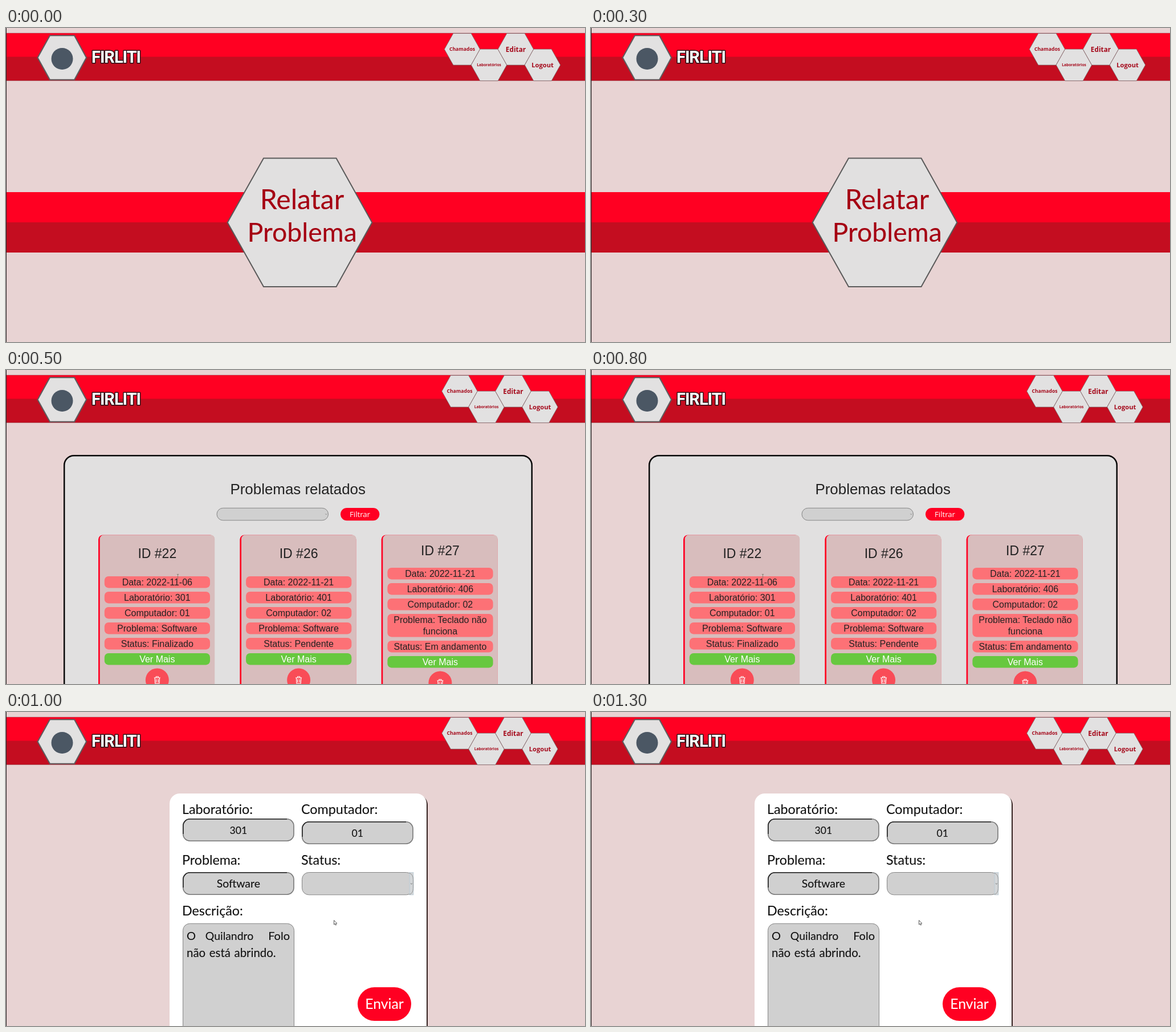
An HTML page for the animation above (1.5 s loop, 1016 px wide and 551 px high).

```html
<!DOCTYPE html>
<html lang="pt">
<head>
<meta charset="utf-8">
<title>Chamados</title>
<style>
  html, body { margin: 0; width: 100%; height: 100%; overflow: hidden; background: #e8d3d3; }
  svg { display: block; width: 1016px; height: 551px; }
  text { white-space: pre; }
  .nav { font-family: "Open Sans", "Noto Sans", sans-serif; font-weight: 700; fill: #a5091b; }
  .soft { font-family: Lato, "Open Sans", sans-serif; stroke-width: .1px; }
  .plain { font-family: "Liberation Sans", Arial, sans-serif; fill: #222; }
  .brand { font: 700 29px Roboto, sans-serif; letter-spacing: -1px; fill: #fff;
           stroke: #2b1015; stroke-width: 3px; stroke-linejoin: round; paint-order: stroke; }
  .scene { visibility: hidden; animation: 1.5s step-end infinite; }
  #home { animation-name: first; }
  #list { animation-name: second; }
  #form { animation-name: third; }
  #nav { animation: shift 1.5s step-end infinite; }
  @keyframes first { 0% { visibility: visible } 33.3333%, 100% { visibility: hidden } }
  @keyframes second { 0% { visibility: hidden } 33.3333% { visibility: visible } 66.6667%, 100% { visibility: hidden } }
  @keyframes third { 0% { visibility: hidden } 66.6667%, 100% { visibility: visible } }
  @keyframes shift { 0% { transform: none } 33.3333%, 100% { transform: translateX(-4.5px) } }
</style>
</head>
<body>
<svg viewBox="0 0 1016 551">
  <rect width="1016" height="551" fill="#e8d3d3"/>
  <rect y="9" width="1016" height="42" fill="#ff0022"/>
  <rect y="50.5" width="1016" height="42" fill="#c40d20"/>
  <path d="M0 9H1016M0 92.5H1016" stroke="#8a4a50" stroke-width=".5"/>
  <path d="M55.5 52L77 13.3H120L141 52L120 90.7H77Z" fill="#e2e1e1" stroke="#5f5c5e" stroke-width="2"/>
  <circle cx="98.5" cy="54" r="19" fill="#4b5764"/>
  <text class="brand" x="150" y="61">FIRLITI</text>
  <g id="nav"></g>
  <g id="home" class="scene"></g>
  <g id="list" class="scene"></g>
  <g id="form" class="scene"></g>
  <rect width="1" height="551" fill="#2a2224"/>
</svg>
<script>
  const RED = '#ff0022', GREY = '#d0d0d0';

  const box = (x, y, w, h, r, fill, extra = '') =>
    `<rect x="${x}" y="${y}" width="${w}" height="${h}" rx="${r}" fill="${fill}" ${extra}/>`;

  const label = (cls, text, x, y, size, extra = 'text-anchor="middle"') =>
    `<text class="${cls}" x="${x}" y="${y}" font-size="${size}" ${extra}>${text}</text>`;

  const soft = (text, x, y, size, color, anchor = 'middle', extra = '') =>
    label('soft', text, x, y, size, `fill="${color}" stroke="${color}" text-anchor="${anchor}" ${extra}`);

  const show = (id, ...parts) => document.getElementById(id).innerHTML = parts.flat().join('');

  // Header menu
  const tab = (text, cx, cy, size, base) =>
    `<path d="M${cx - 31.3} ${cy}l15.6 -27.8h31.4l15.6 27.8l-15.6 27.8h-31.4Z" fill="#e2e1e1" stroke="#77595c" stroke-width=".8"/>` +
    label('nav', text, cx, base, size);

  show('nav',
    tab('Chamados', 800.5, 37.3, 8.6, 40.3),
    tab('Laboratórios', 847.5, 64.9, 6.7, 67.2),
    tab('Editar', 894.5, 37.3, 11.8, 42),
    tab('Logout', 941.5, 64.9, 11.2, 69));

  // Home
  show('home',
    box(0, 288, 1016, 53, 0, RED),
    box(0, 341, 1016, 53, 0, '#c40d20'),
    '<path d="M388.7 341.3L452 228.5H579.5L642.3 341.3L579.5 454H452Z" fill="#e1e0e0" stroke="#5a5a5a" stroke-width="2"/>',
    soft('Relatar', 519.5, 318, 48, '#a50012'),
    soft('Problema', 519.7, 375, 46.4, '#a50012'));

  // Ticket list
  const trash = (x, y) =>
    `<circle cx="${x}" cy="${y}" r="20.5" fill="#f94c57"/>
     <path d="M${x - 5.5} ${y - 4}h11M${x - 2} ${y - 4}v-2h4v2M${x - 4.2} ${y - 3.5}l.6 9.5h7.2l.6 -9.5M${x - 1.7} ${y - 1.5}v5.5M${x + 1.7} ${y - 1.5}v5.5"
       fill="none" stroke="#fff" stroke-width="1.2"/>`;

  function card(x, top, id, rows) {
    const mid = x + 103.3;
    let y = top;
    let out = box(x, 289.5, 204, 300, 8, RED) + box(x + 2.7, 289.5, 201.5, 300, 7, '#d8bdbd') +
      label('plain', `ID #${id}`, mid, 330 + (top - 362) / 3, 23);
    for (const row of [...rows, 'Ver Mais']) {
      const lines = row.split('|'), last = row === 'Ver Mais', h = lines.length * 20;
      out += box(x + 10.8, y, 185.2, h + .4, 7, last ? '#67c83f' : '#fd7176');
      lines.forEach((line, i) =>
        out += label('plain', line, mid, y + 15.7 + i * 20, 16,
          `text-anchor="middle" ${last ? 'style="fill:#fff"' : ''}`));
      y += h + 7;
    }
    return out + trash(mid, y + 20);
  }

  const ticket = (date, lab, pc, problem, status) =>
    [`Data: 2022-11-${date}`, `Laboratório: ${lab}`, `Computador: ${pc}`, `Problema: ${problem}`, `Status: ${status}`];

  show('list',
    box(102.2, 150.2, 820.6, 440, 17, '#e1e0e0', 'stroke="#080808" stroke-width="2.5"'),
    label('plain', 'Problemas relatados', 512.2, 217.5, 25.9),
    box(370, 242.3, 195.5, 21.5, 10.7, GREY, 'stroke="#858585"'),
    '<path d="M560.3 252.3l1.5 1.5l1.5 -1.5" fill="none" stroke="#777" stroke-width=".8"/>',
    box(587, 242, 68.3, 22.3, 11.1, RED),
    label('soft', 'Filtrar', 621, 257.6, 13.2, 'fill="#fff" text-anchor="middle" style="font-family:\'Open Sans\',sans-serif"'),
    card(162, 362, 22, ticket('06', 301, '01', 'Software', 'Finalizado')),
    card(410.3, 362, 26, ticket('21', 401, '02', 'Software', 'Pendente')),
    card(658.6, 347, 27, ticket('21', 406, '02', 'Teclado não|funciona', 'Em andamento')),
    '<path d="M299.8 358.5h3.4M301.5 358.5v8" stroke="#776" stroke-width=".8"/>');

  // Edit form
  const field = (x, y, text, size) =>
    box(x + .8, y + .8, 194.2, 38.4, 12, GREY, 'stroke="#777" stroke-width="1.6"') +
    `<path d="M${x + .8} ${y + 27}V${y + 12.8}a12 12 0 0 1 12 -12H${x + 183}" fill="none" stroke="#222" stroke-width="1.6"/>` +
    soft(text, x + 97.8, y + 27, size, '#111');

  const title = (text, x, y) => soft(text, x, y, 23.3, '#111', 'start');

  show('form',
    box(290, 146, 450, 440, 17, '#33211f'),
    box(287, 143, 451, 440, 18, '#fff'),
    title('Laboratório:', 309, 179),
    title('Computador:', 518, 179),
    title('Problema:', 309, 268),
    title('Status:', 518, 268),
    title('Descrição:', 309, 357),
    field(310, 187, '301', 17.6),
    field(519, 192, '01', 17.6),
    field(310, 281, 'Software', 19.4),
    box(519.5, 281.5, 195, 39.3, 12, GREY, 'stroke="#858585"'),
    box(708, 281.5, 7, 39.5, 0, '#d3d6d8', 'stroke="#a9c3d2" stroke-width=".5"'),
    '<path d="M709.8 300.6l1.6 1.5l1.6 -1.5" fill="none" stroke="#555" stroke-width=".8"/>',
    '<path d="M708 282.5q6.5 3 6.5 11v16q0 8 -6.5 11" fill="none" stroke="#858585" stroke-width=".8"/>',
    box(310.5, 371.3, 195, 220, 12, GREY, 'stroke="#858585"'),
    soft('O', 317, 400, 20, '#111', 'start'),
    soft('Quilandro', 392, 400, 19.4, '#111'),
    soft('Folo', 498, 400, 20, '#111', 'end'),
    soft('não está abrindo.', 317, 430, 20.4, '#111', 'start', 'word-spacing="1.5"'),
    box(617, 483, 94, 59, 29.5, RED),
    soft('Enviar', 664, 521, 24.8, '#fff'),
    '<path d="M575.5 365.5v7.5l1.7 -1.5l1.2 2.6l1.2 -.6l-1.1 -2.5h2.3Z" fill="#fff" stroke="#333" stroke-width=".8"/>');
</script>
</body>
</html>
```
